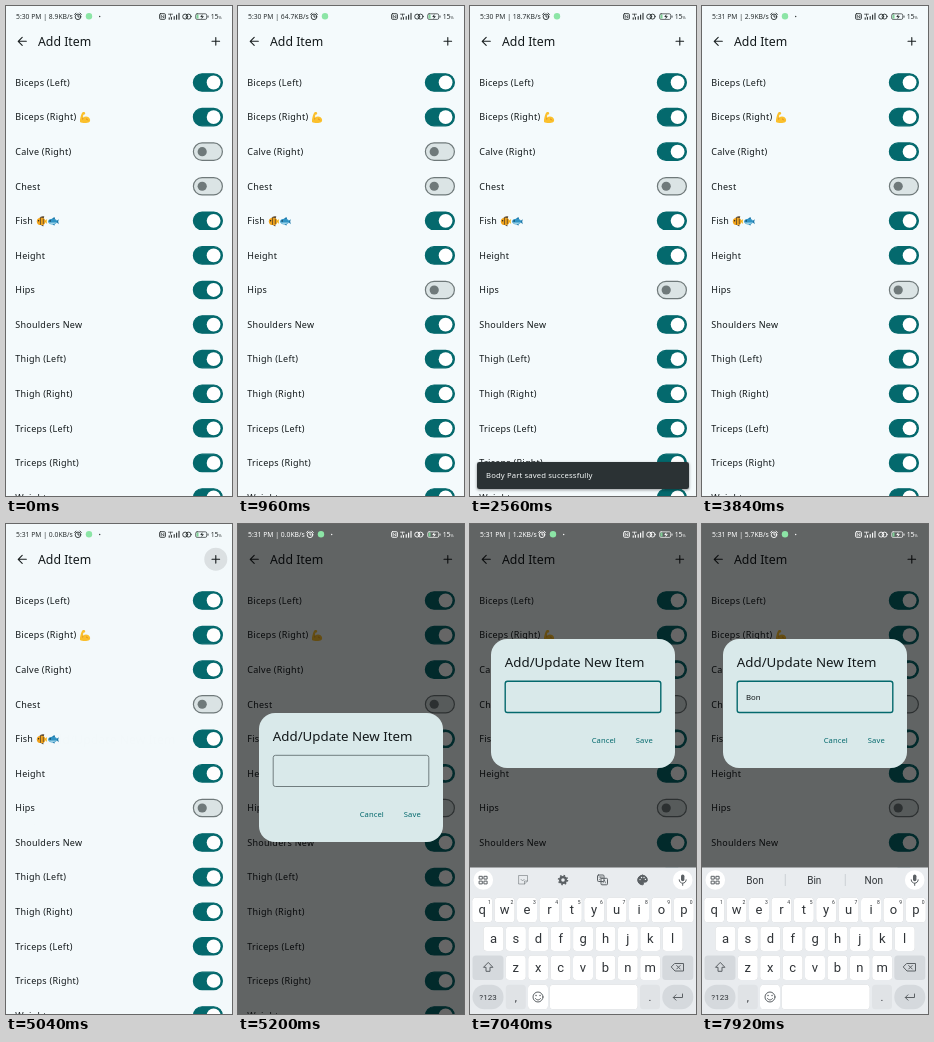
These frames come from a looping animation (226x490 px, 8 s). An HTML page:

```html
<!DOCTYPE html>
<html lang="en">
<head>
<meta charset="utf-8">
<title>Add Item</title>
<style>
:root { --teal: #04696d; --ink: #12181a; --track: #dbe4e5; --line: #6f797a; }
html, body { margin: 0; width: 100%; height: 100%; overflow: hidden; background: #f4fafc; }
svg { display: block; }
#stage { width: 100vw; height: 100vh; }
text { font-family: "Noto Sans", "Open Sans", sans-serif; fill: var(--ink); white-space: pre; }
.row { font-size: 9px; letter-spacing: .27px; }
.stroke { fill: none; stroke: currentColor; stroke-linecap: round; stroke-linejoin: round; }

/* One percent of the loop is 80 ms. */
.anim, .anim * { animation: 8s linear infinite; }

.track { fill: var(--teal); stroke: var(--teal); stroke-width: 1.2; }
.thumb { fill: #fff; cx: 207.6px; r: 6.9px; }
.off .track { fill: var(--track); stroke: var(--line); }
.off .thumb { fill: var(--line); cx: 196.2px; r: 4.6px; }
.ripple { fill: var(--ink); opacity: 0; }
.turn-off .track { animation-name: trackOff; }
.turn-off .thumb { animation-name: thumbOff; }
.turn-off .ripple { animation-name: rippleOff; }
.turn-on .track { animation-name: trackOn; }
.turn-on .thumb { animation-name: thumbOn; }
.turn-on .ripple { animation-name: rippleOn; }
@keyframes trackOff {
  0%, 6% { fill: var(--teal); stroke: var(--teal); }
  7.2%, 100% { fill: var(--track); stroke: var(--line); }
}
@keyframes thumbOff {
  0%, 6% { fill: #fff; cx: 207.6px; r: 6.9px; }
  7.2%, 100% { fill: var(--line); cx: 196.2px; r: 4.6px; }
}
@keyframes trackOn {
  0%, 22% { fill: var(--track); stroke: var(--line); }
  23.2%, 100% { fill: var(--teal); stroke: var(--teal); }
}
@keyframes thumbOn {
  0%, 22% { fill: var(--line); cx: 196.2px; r: 4.6px; }
  23.2%, 100% { fill: #fff; cx: 207.6px; r: 6.9px; }
}
@keyframes rippleOff {
  0%, 4% { opacity: 0; cx: 207.6px; r: 5px; }
  6% { opacity: .1; cx: 207.6px; r: 11.5px; }
  7.2% { opacity: .1; cx: 196.2px; r: 11.5px; }
  10%, 100% { opacity: 0; cx: 196.2px; r: 11.5px; }
}
@keyframes rippleOn {
  0%, 21% { opacity: 0; cx: 196.2px; r: 5px; }
  22% { opacity: .1; cx: 196.2px; r: 11.5px; }
  23.2% { opacity: .1; cx: 207.6px; r: 11.5px; }
  25.5%, 100% { opacity: 0; cx: 207.6px; r: 11.5px; }
}

#plusRipple { animation-name: plusRipple; }
@keyframes plusRipple {
  0%, 61.5% { opacity: 0; r: 4px; }
  63% { opacity: .1; r: 11.5px; }
  65%, 100% { opacity: 0; r: 11.5px; }
}

#snack { transform-box: fill-box; transform-origin: center; animation-name: snack; }
#snack rect { fill: #2b3234; filter: drop-shadow(0 1.5px 1.5px #0006); }
#snack text { fill: #f4f8f8; font-size: 7.7px; letter-spacing: .13px; }
@keyframes snack {
  0%, 15% { opacity: 0; transform: scale(.8); }
  16%, 30.6% { opacity: 1; transform: none; }
  31% { opacity: 0; transform: scale(.8); }
  31.9%, 46.6% { opacity: 1; transform: none; }
  47.6%, 100% { opacity: 0; transform: none; }
}

#scrim { animation-name: scrim; }
@keyframes scrim { 0%, 63% { opacity: 0; } 64.9%, 100% { opacity: .6; } }
#status { animation-name: statusInk; }
#status text { fill: currentColor; }
@keyframes statusInk { 0%, 63% { color: #2a3031; } 64.5%, 100% { color: #fff; } }

#lift { animation-name: lift; }
@keyframes lift {
  0%, 72.5% { transform: none; animation-timing-function: cubic-bezier(.215, .61, .355, 1); }
  78.75%, 100% { transform: translateY(-74px); }
}
#dialog { transform-box: fill-box; transform-origin: center; animation-name: dialog; }
@keyframes dialog {
  0%, 63% { opacity: 0; transform: scale(.92); }
  64.9%, 100% { opacity: 1; transform: none; }
}
#dialog .button { fill: var(--teal); font-size: 7.6px; font-weight: 500; letter-spacing: .1px; }
#field { fill: none; animation-name: field; }
@keyframes field {
  0%, 72% { stroke: #566364; stroke-width: .8px; }
  72.5%, 100% { stroke: var(--teal); stroke-width: 1.4px; }
}
#cursor { animation-name: blink; animation-timing-function: step-end; }
@keyframes blink {
  0% { opacity: 0; } 72.25% { opacity: 1; } 75.25% { opacity: 0; } 78.25% { opacity: 1; }
  81.25% { opacity: 0; } 84% { opacity: 1; } 87% { opacity: 0; } 90% { opacity: 1; }
  98.9%, 100% { opacity: 0; }
}

#keyboard { color: #5b6064; animation-name: keyboard; }
#keyboard text { font-family: Roboto, "Noto Sans", sans-serif; fill: #303438; text-anchor: middle; }
@keyframes keyboard {
  0%, 72.5% { transform: translateY(148px); animation-timing-function: cubic-bezier(.1, .7, .2, 1); }
  76.5%, 100% { transform: none; }
}
.key { fill: #fff; filter: drop-shadow(0 .6px .2px #0003); }
.key.soft { fill: #d5d9dd; filter: none; }
.key.pale { fill: #e0e3e6; filter: none; }
.key.down { fill: #c3c9ce; }
</style>
</head>
<body>
<svg id="stage" viewBox="0 0 226 490" preserveAspectRatio="none">
  <rect width="226" height="490" fill="#f4fafc"/>

  <g color="#171d1e" stroke-width="1.1">
    <path class="stroke" d="M20.3 35.3H12.4M16.2 31.3l-4 4 4 4"/>
    <text x="32" y="39.6" font-size="12.3">Add Item</text>
    <path class="stroke" d="M206 35.3h7.6M209.8 31.5v7.6"/>
    <g class="anim"><circle id="plusRipple" cx="209.8" cy="35.2" r="4" opacity="0"/></g>
  </g>

  <g id="rows"></g>

  <!-- flexed arm -->
  <g transform="translate(73 105.5)">
    <path d="M1 8.2C1.6 5 2.2 2.4 3.4.9 4.4.1 6.2.6 6.2 1.8c0 1-.9 1.6-1.9 1.5L4 6.2C5.6 4.6 8 4.5 9.6 5.8c1.8 1.4 2 3.6.8 4.6C8 12 3 11.6 1 10.5z" fill="#fbc02d"/>
    <path d="M4 6.2 3.6 8M7 7.4c1 .1 1.7.7 1.9 1.5" fill="none" stroke="#d9821c" stroke-width=".7"/>
  </g>
  <!-- striped fish -->
  <g transform="translate(30.3 209.8)">
    <path d="M8 5.5 10.8 3.2 10.4 5.6 10.8 8.2z" fill="#f5b91f"/>
    <path d="M3 2.5C4 .5 6.5 0 8 .8L7.3 3zM3.5 8.5 7 10.8 7.3 8z" fill="#5b4a36"/>
    <ellipse cx="4.8" cy="5.6" rx="4.3" ry="3.6" fill="#f0a31c"/>
    <path d="M4.2 2.2v6.8M7 3v5.2" stroke="#6b5227" stroke-width=".9"/>
    <circle cx="2.3" cy="4.9" r=".7" fill="#222"/>
  </g>
  <!-- blue fish -->
  <g transform="translate(41.8 209.8)">
    <path d="M8 5.8 11 3.4 10.4 5.8 11 8.4zM4 3 6.6 1.2 7.4 3.5zM4.5 8 6.5 10 7 8z" fill="#1976a8"/>
    <ellipse cx="4.8" cy="5.8" rx="4.4" ry="2.8" fill="#2f93c4"/>
    <path d="M.7 6.8c2 2 6 2 8 0z" fill="#9ed3e8"/>
    <circle cx="2.4" cy="5.1" r=".7" fill="#123"/>
  </g>

  <g class="anim">
    <g id="snack" opacity="0">
      <rect x="7" y="456" width="212" height="27" rx="2.3"/>
      <text x="16" y="472.2">Body Part saved successfully</text>
    </g>
    <rect id="scrim" width="226" height="490" opacity="0"/>
  </g>

  <g class="anim"><g id="status" stroke-width=".9">
    <text id="clock" x="10" y="13.1" font-size="6.8"></text>
    <g id="notes">
      <circle class="stroke" cx="72" cy="10.8" r="2.8"/>
      <path class="stroke" d="M72 9.2v1.8h1.2M68.6 8.4 70 7.2M75.4 8.4 74 7.2"/>
      <circle cx="83" cy="10.3" r="3.2" fill="#8ce5a6"/>
      <circle id="dot" cx="93.7" cy="10.5" r=".7" fill="currentColor"/>
    </g>
    <rect class="stroke" x="153.6" y="7.7" width="5.8" height="5.6" rx="1"/>
    <path class="stroke" d="M155.2 12V9.3l2.6 2.7V9.3" stroke-width=".7"/>
    <path class="stroke" d="M162.5 8.2h4M164.5 8.2v2" stroke-width=".7"/>
    <path class="stroke" d="M163.2 11.8v1.5M165.4 11.3v2M168.2 10.5v2.8M170.6 9v4.3M173 7.4v5.9" stroke-linecap="butt" stroke-width="1.1"/>
    <circle class="stroke" cx="179.2" cy="10.6" r="2.5"/>
    <circle class="stroke" cx="182.6" cy="10.6" r="2.5"/>
    <rect class="stroke" x="189.7" y="7.8" width="11" height="5.6" rx="1.4" stroke-width=".7"/>
    <path d="M202 9.6v2" stroke="currentColor"/>
    <rect x="190.5" y="8.6" width="2" height="4" fill="#7fcf96"/>
    <path d="M196.5 8 194.2 11h1.7l-.6 2.3 2.7-3.1h-1.8z" fill="currentColor"/>
    <text x="204.7" y="13.1" font-size="6.8">15</text>
    <text x="212.3" y="13.1" font-size="4.2">%</text>
  </g></g>

  <g class="anim"><g id="lift">
    <g id="dialog" opacity="0">
      <rect x="21" y="189" width="184" height="129" rx="16" fill="#d9e9ea"/>
      <text x="34.8" y="217" font-size="13.3">Add/Update New Item</text>
      <rect id="field" x="35.2" y="231.3" width="155.6" height="31.2" rx="2.3"/>
      <text id="typed" x="44" y="250" font-size="7.8"></text>
      <rect id="cursor" x="44" y="241" width="1.2" height="13" fill="#04696d"/>
      <text class="button" x="121.7" y="293.4">Cancel</text>
      <text class="button" x="165.8" y="293.4">Save</text>
    </g>
  </g></g>

  <g class="anim"><g id="keyboard" transform="translate(0 148)">
    <rect y="343.5" width="226" height="147" fill="#e9ecef"/>
    <circle cx="13.3" cy="356" r="9.8" fill="#fff"/>
    <circle cx="212.7" cy="356" r="9.8" fill="#fff"/>
    <path class="stroke" d="M9.5 352.3h2.8v2.8H9.5zM14.3 352.3h2.8v2.8h-2.8zM9.5 357.1h2.8v2.8H9.5zM14.3 357.1h2.8v2.8h-2.8z"/>
    <rect x="211" y="350.5" width="3.4" height="6.8" rx="1.7" fill="currentColor"/>
    <path class="stroke" d="M209.2 355.8c0 4.6 7 4.6 7 0M212.7 359.4v2"/>
    <g id="tools" class="stroke">
      <path d="M49 351.5h8.5v5.5l-3 3H49zM54.5 360v-3h3M51 355.5c.6 1.5 2.6 1.5 3.2 0" opacity=".5"/>
      <circle cx="93" cy="356" r="2.9" stroke-width="2.2"/>
      <circle cx="93" cy="356" r="4.4" stroke-width="1.7" stroke-dasharray="1.5 1.955" stroke-linecap="butt"/>
      <rect x="127.5" y="351" width="6.5" height="6.5" rx="1"/>
      <rect x="131" y="354.3" width="6.5" height="6.5" rx="1"/>
      <path d="M129 353h3.5M130.8 353c0 1.5-.8 2.5-1.8 3M133 359l1.3-3 1.3 3" stroke-width=".7"/>
      <path d="M172.5 351.2a4.8 4.8 0 1 0 0 9.6c1.6 0 .6-1.9 1.3-2.5s3.5.5 3.5-2.4c0-2.7-2.2-4.7-4.8-4.7z" fill="currentColor"/>
      <path d="M170 355.6h.1M171.5 353.5h.1M174 353.5h.1M175.4 355.4h.1" stroke="#e9ecef" stroke-width="1.3"/>
    </g>
    <g id="words" font-size="10">
      <path d="M83.3 350v12M143.3 350v12" stroke="#c6cbcf" stroke-width=".8"/>
      <text x="53" y="359.7"></text><text x="112.3" y="359.7"></text><text x="171.8" y="359.7"></text>
    </g>
    <g id="keys"></g>
    <g class="stroke">
      <path d="M18 438.7 13.5 443.3h2.5v4h4v-4h2.5z"/>
      <path d="M205 439.5h8.5v7.5H205l-3.5-3.75zM206.7 441.5l3.5 3.5M210.2 441.5l-3.5 3.5"/>
      <circle cx="68" cy="473" r="5"/>
      <path d="M66 471.5h.1M70 471.5h.1" stroke-width="1.4"/>
      <path d="M65.5 474.5c1 2 4 2 5 0"/>
      <path d="M212.5 470v3.5h-9M206 470.8l-2.7 2.7 2.7 2.7"/>
    </g>
  </g></g>
</svg>
<script>
const LOOP = 8000;
const $ = id => document.getElementById(id);

const rows = ["Biceps (Left)", "Biceps (Right)", "Calve (Right)", "Chest", "Fish", "Height", "Hips",
  "Shoulders New", "Thigh (Left)", "Thigh (Right)", "Triceps (Left)", "Triceps (Right)", "Weight"];
const switchClass = { "Calve (Right)": "off anim turn-on", "Chest": "off", "Hips": "anim turn-off" };

$("rows").innerHTML = rows.map((name, i) => {
  const y = 76.5 + i * 34.58;
  return `<text class="row" x="9.2" y="${y + 3.3}">${name}</text>
    <g class="${switchClass[name] || ""}">
      <rect class="track" x="187.4" y="${y - 8.7}" width="29" height="17.4" rx="8.7"/>
      <circle class="ripple" cy="${y}"/><circle class="thumb" cy="${y}"/>
    </g>`;
}).join("");

function key(x, y, w, label, { kind = "", size = 13, rx = 3.5 } = {}) {
  return `<rect class="key ${kind}" data-key="${label}" x="${x - w / 2}" y="${y - 12.2}" width="${w}" height="24.4" rx="${rx}"/>
    <text x="${x}" y="${y + size * .34}" font-size="${size}">${label}</text>`;
}

const letters = [["qwertyuiop", 12.2, 386], ["asdfghjkl", 23.5, 414.7], ["zxcvbnm", 45.8, 443.7]];
let keys = letters.map(([set, x0, y], r) => [...set].map((c, i) => {
  const x = x0 + i * 22.4;
  const digit = r ? "" : `<text x="${x + 7.3}" y="380.3" font-size="5">${(i + 1) % 10}</text>`;
  return key(x, y, 20, c) + digit;
}).join("")).join("");
const soft = { kind: "soft" }, pill = { kind: "soft", size: 8, rx: 12 }, pale = { kind: "pale", size: 11 };
keys += key(18, 443.7, 31, "", soft) + key(207.8, 443.7, 31, "", soft)
  + key(18, 473, 31, "?123", pill) + key(45.8, 473, 20, ",", pale) + key(68, 473, 20, "")
  + key(123.7, 473, 88, "") + key(180, 473, 20, ".", pale) + key(207.8, 473, 31, "", pill);
$("keys").innerHTML = keys;

const clock = [[0, "5:30 PM"], [2880, "5:31 PM"]];
const speed = [[0, "8.9"], [640, "64.7"], [1700, "18.7"], [2880, "6.4"], [3760, "2.9"],
  [4480, "0.0"], [6000, "1.2"], [7480, "5.7"]];
const typing = [[0, ""], [7440, "B"], [7560, "Bo"], [7680, "Bon"]];
const hints = { "B": ["B", "But", "Be"], "Bo": ["Bo", "Box", "Boy"], "Bon": ["Bon", "Bin", "Non"] };

const at = (steps, t) => steps.filter(([start]) => start <= t).pop();
const words = $("words").querySelectorAll("text");
const keyRects = [...document.querySelectorAll("[data-key]")];
const master = $("scrim").getAnimations()[0];

function draw() {
  const t = (master.currentTime || 0) % LOOP;
  const rate = at(speed, t)[1];
  const wide = rate.length > 3;
  $("clock").textContent = `${at(clock, t)[1]} | ${rate}KB/s`;
  $("notes").setAttribute("transform", `translate(${wide ? 4 : 0} 0)`);
  $("dot").style.opacity = wide ? 0 : 1;

  const [since, text] = at(typing, t);
  $("typed").textContent = text;
  $("cursor").setAttribute("x", 44 + (text ? $("typed").getComputedTextLength() + .4 : 0));
  $("tools").style.display = text ? "none" : "";
  $("words").style.display = text ? "" : "none";
  words.forEach((el, i) => el.textContent = text ? hints[text][i] : "");

  const pressed = t - since < 90 ? text.slice(-1).toLowerCase() : "";
  keyRects.forEach(el => el.classList.toggle("down", pressed !== "" && el.dataset.key === pressed));
  requestAnimationFrame(draw);
}
draw();
</script>
</body>
</html>
```
